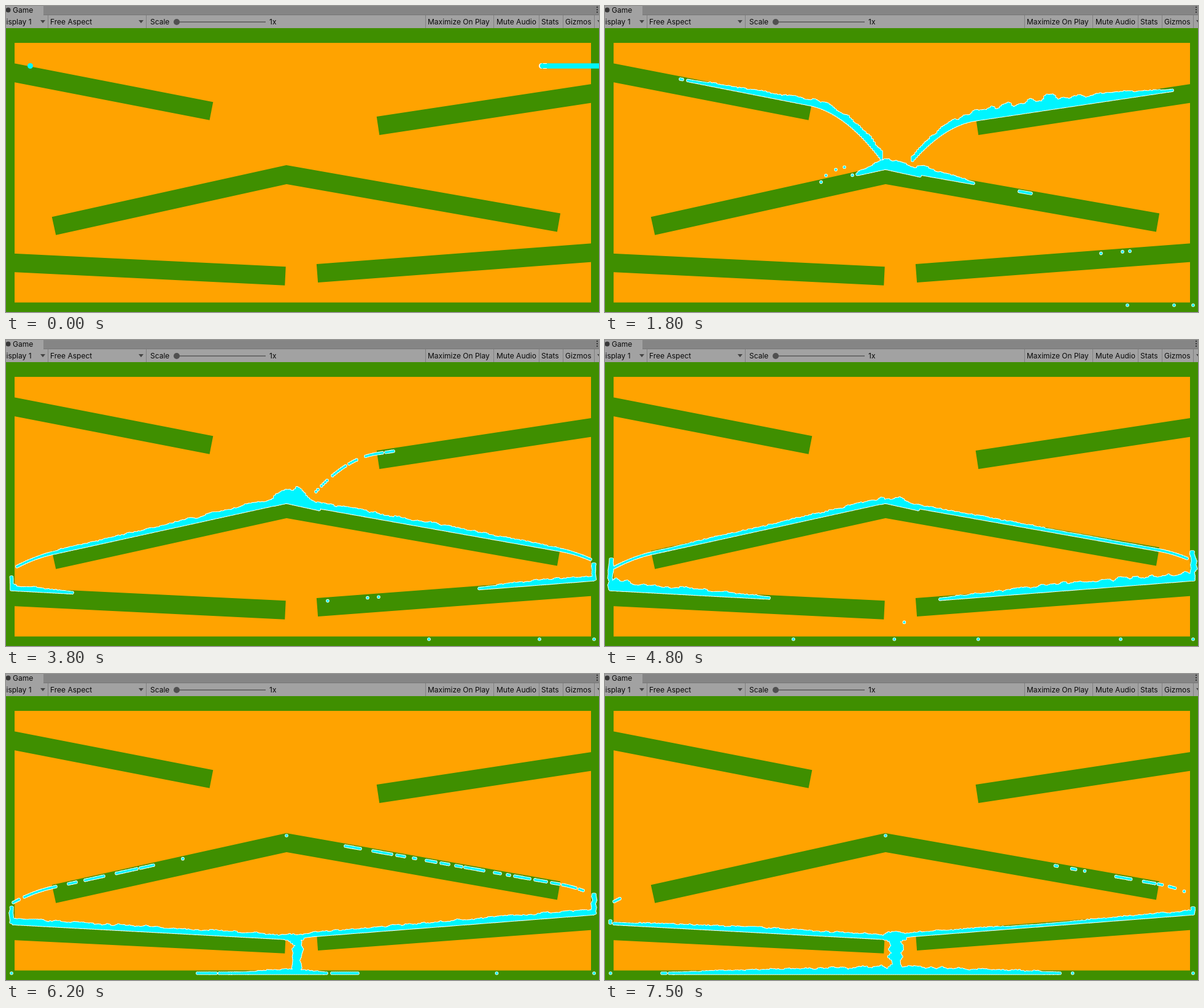
Write an HTML page with a canvas that moves like this. It is 966x498 px and loops after 7600 ms.

```html
<!DOCTYPE html>
<html>
<head>
<meta charset="utf-8">
<style>
  html, body { margin: 0; width: 100%; height: 100%; overflow: hidden; background: #3f8f00; }
  canvas { display: block; }
</style>
</head>
<body>
<canvas id="stage" width="966" height="498"></canvas>
<script>
const ctx = document.getElementById('stage').getContext('2d');
const LOOP = 7600, STEP = 100, SPACING = 3, FLOOR = 487;
const GREEN = '#3f8f00', ORANGE = '#ffa300', CYAN = '#00f5ff';

function hash(n) {
  const v = Math.sin(n * 127.1 + 11.7) * 43758.5453;
  return v - Math.floor(v);
}

function noise(x) {
  const i = Math.floor(x), f = x - i;
  return hash(i) + (hash(i + 1) - hash(i)) * f * f * (3 - 2 * f);
}

// Linear blend of rows whose first entry is a time; null outside their span.
function blend(rows, t) {
  for (let i = 1; i < rows.length; i++) {
    const a = rows[i - 1], b = rows[i];
    if (t >= a[0] && t <= b[0]) return a.map((v, k) => v + (b[k] - v) * (t - a[0]) / (b[0] - a[0]));
  }
  return null;
}

// Straight slope from a start to a lip, then a parabola beyond it.
function slope(x0, y0, x1, y1, curve = 0) {
  const dir = Math.sign(x1 - x0);
  return x => y0 + (y1 - y0) * (x - x0) / (x1 - x0) + curve * Math.max(0, (x - x1) * dir) ** 2;
}

const upperLeft = slope(21, 99, 333, 160, 0.0048);
const upperRight = slope(962, 131.5, 604, 185, 0.0048);
const ridgeLeft = slope(455, 264, 77, 347, 0.0025);
const ridgeRight = slope(457, 263, 902, 342, 0.0025);
const lowerLeft = slope(9, 406, 455, 430);
const lowerRight = slope(958, 390, 506, 425, 0.0025);
const ridge = x => 264 + 0.22 * Math.abs(x - 457);
const floor = () => FLOOR;

let fluid, now, seed;

function mark(x1, y1, x2, y2) {
  fluid.moveTo(x1, y1);
  fluid.lineTo(x2 + 0.02, y2);
}

// Key: time, start x, end x, depth at start, middle and end.
// Depth above 0 is pixels of pile; from -1 to 0 it thins a single row into beads.
function pour(base, speed, ...keys) {
  seed += 517;
  const key = blend(keys, now);
  if (!key) return;
  const [, from, to, ...depths] = key;
  const shift = Math.sign(to - from) * speed * now / 1000;
  const left = Math.min(from, to), right = Math.max(from, to);
  for (let k = Math.ceil((left - shift) / SPACING); k * SPACING + shift <= right; k++) {
    const x = k * SPACING + shift;
    const f = Math.min(1.999, (x - from) / (to - from) * 2), i = Math.floor(f);
    const depth = depths[i] + (depths[i + 1] - depths[i]) * (f - i);
    if (depth < 0 && noise(k / 2.2 + seed) > 1 + depth) continue;
    const rough = depth > 1 ? hash(k + seed) * 1.5 : 0;
    const pile = Math.max(0, depth) * (0.6 + 0.7 * noise(k / 3 + seed + 90)) + rough;
    mark(x, base(x), x, base(x) - pile);
  }
}

// Vertical body from y, growing up or down. Key: time, length, width.
function column(x, y, dir, speed, ...keys) {
  seed += 517;
  const key = blend(keys, now);
  if (!key) return;
  const [, length, width] = key;
  const shift = speed * now / 1000;
  for (let k = Math.ceil(-shift / SPACING); k * SPACING + shift <= length; k++) {
    const s = k * SPACING + shift;
    const half = width * (0.3 + 0.5 * noise(k / 2 + seed));
    const sway = (noise(k / 2 + seed + 40) - 0.5) * Math.min(4, width);
    mark(x + sway - half, y + s * dir, x + sway + half, y + s * dir);
  }
}

function upperStreams() {
  pour(upperLeft, 230,
    [600, 25, 54, 7, 7, 5], [1000, 26, 320, 1, 6, 4], [1400, 50, 445, 2, 6, 8],
    [1800, 123, 452, -.6, 5, 10], [2900, 353, 440, -.5, -.2, -.2], [3250, 440, 450, -.7, -.7, -.7]);
  if (now < 800) pour(slope(966, 105, 862, 108), 0, [600, 966, 862, 9, 9, 6], [800, 966, 862, 9, 9, 6]);
  else pour(upperRight, 220,
    [800, 962, 822, 28, 26, 3], [1000, 962, 645, 26, 18, 3], [1400, 960, 490, 8, 20, 10],
    [1800, 924, 500, -.6, 18, 4], [2900, 790, 505, -.6, 2, 4], [3500, 690, 505, -.6, -.2, 0],
    [4700, 510, 500, -.8, -.8, -.8]);
}

function ridgeStreams() {
  pour(ridge, 0,
    [1300, 450, 475, 0, 5, 0], [1800, 412, 515, 2, 16, 6], [2900, 425, 512, 25, 42, 4],
    [4800, 450, 512, 0, 11, 1], [5500, 456, 460, -.5, -.5, -.5]);
  pour(ridgeLeft, 210,
    [1500, 455, 440, 0, 0, 0], [1800, 455, 410, 4, 2, 0], [2900, 455, 155, 14, 6, -.4],
    [3400, 455, 9, 9, 4, -.3], [4800, 455, 10, 5, 2, -.3], [5600, 411, 10, -.7, -.2, 0],
    [7500, 25, 10, -.7, -.7, -.7]);
  pour(ridgeRight, 215,
    [1500, 457, 490, 2, 2, 0], [1800, 457, 600, 8, 9, 0], [2900, 457, 957, 10, 8, 0],
    [4800, 485, 950, 2, 1, 0], [5600, 460, 945, -.4, -.5, 0], [7600, 720, 945, -.8, -.6, -.6]);
  column(9, 405, -1, -40, [3200, 4, 0], [4800, 50, 3], [5600, 38, 2], [7600, 3, 1]);
  column(958, 390, -1, -40, [2700, 4, 0], [4800, 45, 4], [5600, 42, 3], [7600, 9, 2]);
}

function lowerStreams() {
  pour(lowerLeft, 150,
    [3200, 9, 15, 0, 0, 0], [4800, 9, 268, 13, 6, 0], [5450, 9, 455, 8, 5, 3], [7600, 15, 455, 0, 4, 3]);
  pour(lowerRight, 150,
    [3000, 958, 948, 0, 0, 0], [4800, 958, 545, 9, 8, 0], [5250, 958, 463, 10, 6, 0],
    [6800, 958, 460, 3, 3, 3], [7600, 958, 460, 3, 0, 3]);
  column(459, 434, 1, 180, [5300, 5, 0], [5600, 53, 1], [5900, 53, 7], [6100, 53, 3]);
  column(474, 430, 1, 180, [5900, 54, 5], [6300, 55, 11], [7600, 56, 14]);
  pour(() => 431, 0, [5500, 456, 468, 1, 1, 0], [6300, 455, 487, 4, 9, 1], [7600, 455, 490, 4, 17, 3]);
  pour(floor, 120,
    [5450, 470, 458, 0, 0, 0], [5600, 470, 410, 0, -.4, -.7], [6800, 470, 212, 8, 1, -.3], [7600, 470, 75, 8, 4, -.35]);
  pour(floor, 120,
    [5450, 470, 478, 0, 0, 0], [5600, 470, 505, 0, -.4, -.6], [6800, 470, 645, 8, 0, 0], [7600, 470, 755, 8, 5, -.1]);
}

// Lone drops move at a steady speed (pixels per ms) from where they are at 1800 ms.
function strayDrops() {
  const age = now - 1800;
  const dot = (x, y) => mark(x, y, x, y);
  if (age > -400) {
    dot(851 - 0.081 * age, FLOOR);
    dot(927 - 0.029 * age, FLOOR);
    dot(958, FLOOR);
    for (const [x, speed, floorSpeed] of [[808, .142, .228], [843, .127, .1], [855, .124, .1]]) {
      const fall = age - (x - 506) / speed;
      if (fall < 0) dot(x - speed * age, lowerRight(x - speed * age) + 1);
      else dot(Math.max(9, 506 - floorSpeed * fall), Math.min(FLOOR, 425 + fall * fall * 0.001));
    }
  }
  if (age >= -200) {
    for (const [x0, speed, lift] of [[352, .295, 0], [376, .26, 15], [390, .234, 16], [360, .22, 9], [403, .22, 0]]) {
      const x = x0 - speed * age;
      if (x > 9) dot(x, ridgeLeft(x) - lift * Math.max(0, 1 - age / 300));
    }
    const x = 675 + 0.32 * age;
    if (x < 938) mark(x, ridgeRight(x), x + 19, ridgeRight(x + 19));
  }
  if (now >= 4800) dot(457, 263);
}

function drawFluid(t) {
  fluid = new Path2D();
  now = t;
  seed = 0;
  upperStreams();
  ridgeStreams();
  lowerStreams();
  strayDrops();
  ctx.lineCap = ctx.lineJoin = 'round';
  for (const [color, width] of [['#fff', 5.6], [CYAN, 3.8]]) {
    ctx.strokeStyle = color;
    ctx.lineWidth = width;
    ctx.stroke(fluid);
  }
}

function disc(x, y, r, color) {
  ctx.fillStyle = color;
  ctx.beginPath();
  ctx.arc(x, y, r, 0, Math.PI * 2);
  ctx.fill();
}

function rect(x, y, w, h, color) {
  ctx.fillStyle = color;
  ctx.fillRect(x, y, w, h);
}

function bar(...points) {
  ctx.strokeStyle = GREEN;
  ctx.lineWidth = 30.3;
  ctx.lineCap = 'butt';
  ctx.lineJoin = 'miter';
  ctx.beginPath();
  for (let i = 0; i < points.length; i += 2) ctx.lineTo(points[i], points[i + 1]);
  ctx.stroke();
}

function drawScene() {
  rect(0, 0, 966, 498, GREEN);
  rect(14, 60, 939, 422.5, ORANGE);
  bar(0, 106, 334.5, 171);
  bar(966, 140.5, 606, 195);
  bar(78, 358, 457, 274.5, 900.5, 352.5);
  bar(0, 417.3, 455, 439.5);
  bar(966, 400.5, 507, 435);
}

function drawSource() {
  disc(39.5, 97.5, 4.5, CYAN);
  disc(872.5, 97.5, 4.5, '#fff');
  disc(874, 97.5, 4.2, CYAN);
  rect(874, 93.3, 92, 8.5, CYAN);
  rect(875, 93, 6, 1, '#fff');
  rect(875, 101, 6, 1, '#fff');
}

function arrow(x) {
  ctx.fillStyle = '#444';
  ctx.beginPath();
  ctx.moveTo(x - 4, 23);
  ctx.lineTo(x + 4, 23);
  ctx.lineTo(x, 28);
  ctx.fill();
}

function drawToolbar() {
  rect(0, 0, 966, 36, '#a2a2a2');
  rect(61, 0, 905, 14, '#858585');
  rect(61, 14, 905, 1, '#777');
  for (const x of [68, 228, 683, 794, 868, 907, 958]) rect(x, 15, 1, 21, '#808080');
  [60, 220, 967].forEach(arrow);
  rect(278, 25, 145, 2, '#6b6b6b');
  disc(278, 26, 5, '#505050');
  disc(3.5, 6.5, 4, '#383838');
  for (const y of [1, 5, 9]) rect(962, y, 2, 2, '#333');
  ctx.font = '12px Inter, sans-serif';
  ctx.fillStyle = '#090909';
  ctx.fillText('Game', 11, 11);
  const labels = { 'isplay 1': 0.5, 'Free Aspect': 72, 'Scale': 235, '1x': 429,
    'Maximize On Play': 687, 'Mute Audio': 799, 'Stats': 872, 'Gizmos': 911 };
  for (const text in labels) ctx.fillText(text, labels[text], 30);
}

function draw(t) {
  drawScene();
  if (t < 600) drawSource();
  else drawFluid(t < 800 ? 600 : t);
  drawToolbar();
}

const begin = performance.now();
function tick() {
  const t = (performance.now() - begin) % LOOP;
  draw(Math.floor(t / STEP) * STEP);
  requestAnimationFrame(tick);
}
tick();
</script>
</body>
</html>
```
